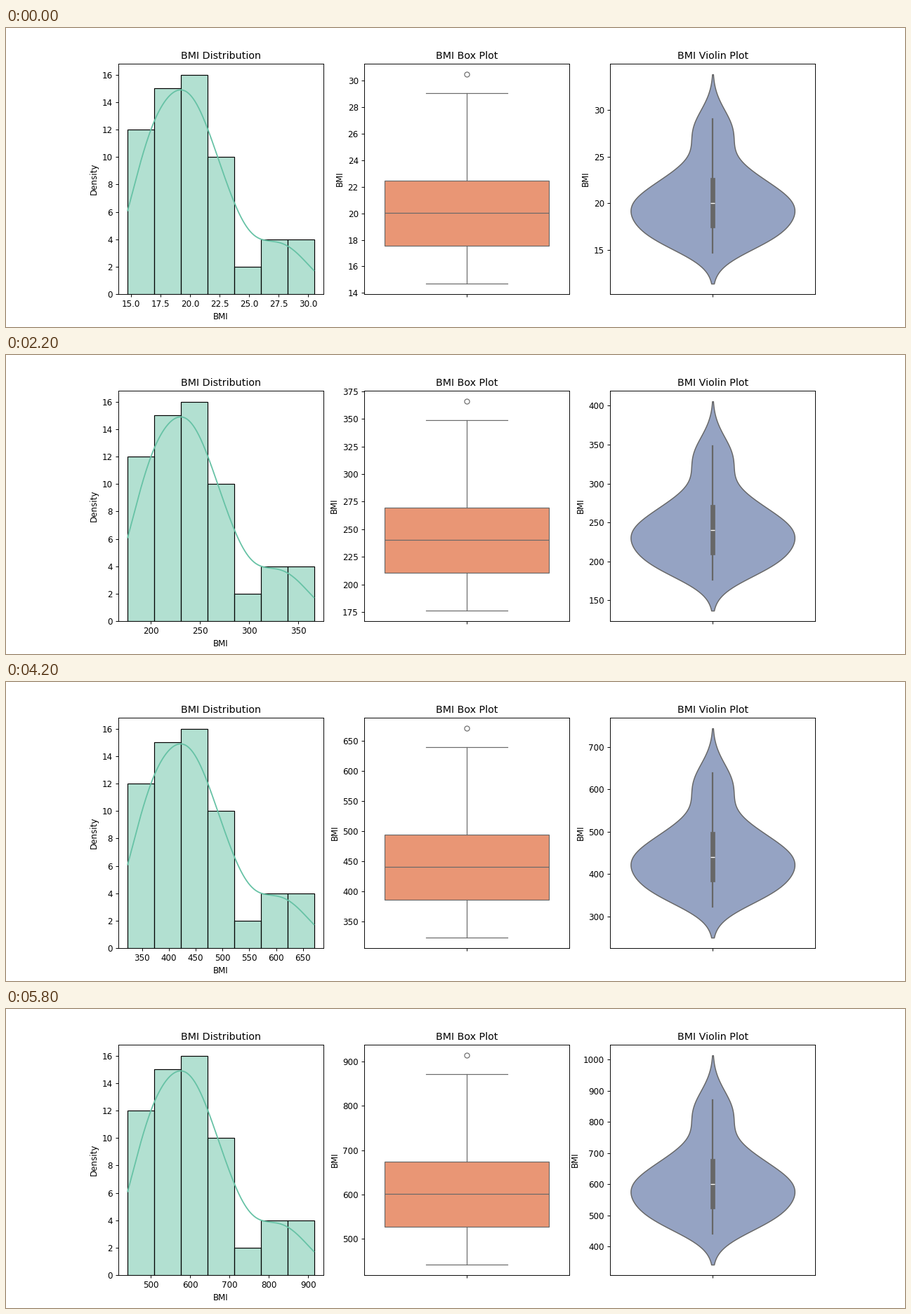
A matplotlib script that plays this animation: 1280 by 427 pixels, repeating every 6 s.

```python
import numpy as np
import matplotlib.pyplot as plt
from matplotlib.animation import FuncAnimation
from matplotlib.colors import to_rgba

DPI = 256 / 3
FRAMES = 30
GREEN, ORANGE, BLUE = "#66c2a5", "#e99675", "#95a3c3"
BOX_GRAY, VIOLIN_GRAY = "#696969", "#676767"
BANDWIDTH = 1.663

bmi = np.concatenate([
    [14.70], np.linspace(15.15, 16.87, 11),
    np.linspace(17.05, 19.15, 15),
    np.linspace(19.25, 19.85, 4), np.linspace(20.02, 21.0, 12),
    np.linspace(21.75, 23.6, 10),
    [24.4, 25.4, 26.2, 26.7, 27.2, 27.6, 28.3, 28.7, 29.05, 30.48],
])
low, high = bmi.min(), bmi.max()
q1, median, q3 = np.percentile(bmi, [25, 50, 75])
whisker_top = bmi[bmi <= q3 + 1.5 * (q3 - q1)].max()


def kde(x):
    z = (x[:, None] - bmi) / BANDWIDTH
    return np.exp(-z ** 2 / 2).mean(axis=1) / (BANDWIDTH * np.sqrt(2 * np.pi))


curve_x = np.linspace(low, high, 200)
curve_y = kde(curve_x) * len(bmi) * (high - low) / 7
violin_y = np.linspace(low - 2 * BANDWIDTH, high + 2 * BANDWIDTH, 100)
violin_w = kde(violin_y)
violin_w *= 0.4 / violin_w.max()

plt.rcParams["font.family"] = "DejaVu Sans"
fig, (hist_ax, box_ax, violin_ax) = plt.subplots(
    1, 3, figsize=(1280.0001 / DPI, 427.0001 / DPI), dpi=DPI)


def draw_hist(ax, k):
    ax.hist(bmi * k, bins=7, facecolor=to_rgba(GREEN, 0.5),
            edgecolor="black", linewidth=1)
    ax.plot(curve_x * k, curve_y, color=GREEN, linewidth=1.5)
    ax.set(title="BMI Distribution", xlabel="BMI", ylabel="Density")


def draw_box(ax, k):
    line = dict(color=BOX_GRAY, linewidth=1)
    ax.boxplot(bmi * k, positions=[0], widths=0.8, capwidths=0.4,
               patch_artist=True, manage_ticks=False,
               boxprops=dict(facecolor=ORANGE, edgecolor=BOX_GRAY, linewidth=1),
               whiskerprops=line, capprops=line, medianprops=line,
               flierprops=dict(marker="o", markersize=6,
                               markerfacecolor="none",
                               markeredgecolor=BOX_GRAY))
    style_category(ax, "BMI Box Plot")


def draw_violin(ax, k):
    ax.fill_betweenx(violin_y * k, -violin_w, violin_w, facecolor=BLUE,
                     edgecolor=VIOLIN_GRAY, linewidth=1.25)
    ax.plot([0, 0], [low * k, whisker_top * k],
            color=VIOLIN_GRAY, linewidth=1.875)
    ax.plot([0, 0], [q1 * k, q3 * k], color=VIOLIN_GRAY, linewidth=5.625)
    ax.plot([0], [median * k], marker="_", markersize=4.7,
            markeredgewidth=1.125, color="white")
    style_category(ax, "BMI Violin Plot")


def style_category(ax, title):
    ax.set(title=title, ylabel="BMI", xlim=(-0.5, 0.5))
    ax.set_xticks([0], [""])


def update(frame):
    k = frame + 1
    for ax, draw in ((hist_ax, draw_hist), (box_ax, draw_box),
                     (violin_ax, draw_violin)):
        ax.clear()
        draw(ax, k)
    return []


anim = FuncAnimation(fig, update, frames=FRAMES, interval=200,
                     init_func=lambda: update(0), repeat=True, repeat_delay=0)
plt.show()
```
